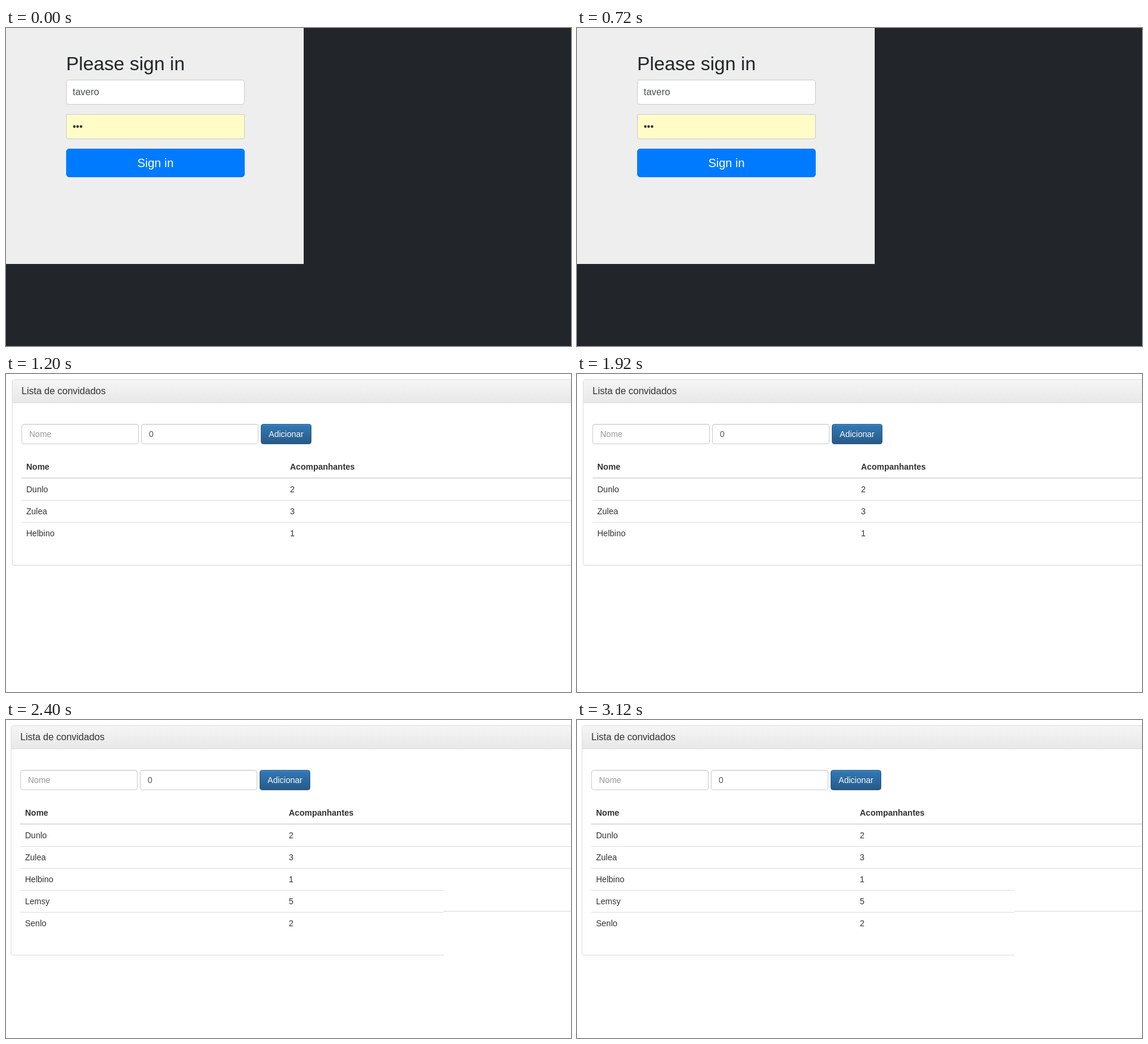
An HTML page that plays this animation: 949 by 535 pixels, repeating every 3.6 s.

```html
<!DOCTYPE html>
<html lang="pt">
<head>
<meta charset="utf-8">
<title>Lista de convidados</title>
<style>
  * { box-sizing: border-box; margin: 0; }
  html, body { width: 100%; height: 100%; overflow: hidden; background: #fff; }
  body { position: relative; font: 14px/20px "Liberation Sans", Arial, sans-serif; color: #333; }
  .scene { position: absolute; inset: 0; overflow: hidden; }

  #login { background: #22262a; }
  .page { width: 500px; height: 397px; padding: 40.6px 99px 0 101px; background: #eee; color: #212529; }
  .page h2 { height: 46.4px; font: 32px/38.4px "Liberation Sans", Arial, sans-serif; white-space: nowrap; }
  .page div { height: 42px; margin-bottom: 16px; padding: 0 10px; border: 1px solid #ccc; border-radius: 4px;
    background: #fff; color: #495057; font-size: 16px; line-height: 40px; }
  .page .secret { border-radius: 0 0 4px 4px; background: #fffcc8; color: #333; }
  .page .submit { height: 48px; border-color: #007bff; border-radius: 5px; background: #007bff; color: #fff;
    font-size: 20px; line-height: 46px; text-align: center; }

  #after { inset: 9px auto auto 8px; width: 727px; height: 387px; background: #fff; }
  .panel { position: absolute; width: 1100px; padding: 0 15px 35px; border: 1px solid #ddd; border-radius: 4px;
    background: #fff; box-shadow: 0 1px 2px rgba(0,0,0,.05); }
  #before .panel { left: 10px; top: 9px; }
  .panel h3 { height: 39px; margin: 0 -15px 35px; padding: 10px 15px; border-bottom: 1px solid #ddd;
    border-radius: 3px 3px 0 0; background: linear-gradient(#f5f5f5, #e8e8e8);
    font: 16px/17.6px "Liberation Sans", Arial, sans-serif; }
  .form { display: flex; gap: 4px; margin-bottom: 20px; }
  .form span { width: 197px; height: 34px; padding: 6px 12px; border: 1px solid #ccc; border-radius: 4px;
    color: #555; box-shadow: inset 0 1px 1px rgba(0,0,0,.075); }
  .form .hint { color: #999; }
  .form .add { width: 85px; padding: 6px 0; border-color: #245580; color: #fff; text-align: center;
    background: linear-gradient(#337ab7, #265a88); text-shadow: 0 -1px 0 rgba(0,0,0,.2);
    box-shadow: inset 0 1px 0 rgba(255,255,255,.15), 0 1px 1px rgba(0,0,0,.075); }
  .row { display: grid; grid-template-columns: 443px 1fr; padding: 8px; }
  .row + .row { border-top: 1px solid #ddd; }
  .head { font-weight: bold; }
  .head + .row { border-top-width: 2px; }
</style>
</head>
<body>
<div class="scene" id="login">
  <div class="page">
    <h2>Please sign in</h2>
    <div>tavero</div>
    <div class="secret">•••</div>
    <div class="submit">Sign in</div>
  </div>
</div>
<div class="scene" id="before"></div>
<div class="scene" id="after"></div>
<script>
  const STEP = 1200;
  const guests = [["Dunlo", 2], ["Zulea", 3], ["Helbino", 1], ["Lemsy", 5], ["Senlo", 2]];
  const [login, before, after] = document.querySelectorAll(".scene");

  const row = ([name, count], type = "") =>
    `<div class="row ${type}"><span>${name}</span><span>${count}</span></div>`;

  const panel = list => `<div class="panel">
    <h3>Lista de convidados</h3>
    <div class="form"><span class="hint">Nome</span><span>0</span><span class="add">Adicionar</span></div>
    ${row(["Nome", "Acompanhantes"], "head")}${list.map(guest => row(guest)).join("")}
  </div>`;

  before.innerHTML = panel(guests.slice(0, 3));
  after.innerHTML = panel(guests);

  // The longer list covers only the left part of the shorter one.
  function draw() {
    const step = Math.floor(performance.now() / STEP) % 3;
    login.hidden = step !== 0;
    before.hidden = step === 0;
    after.hidden = step !== 2;
    requestAnimationFrame(draw);
  }
  draw();
</script>
</body>
</html>
```
